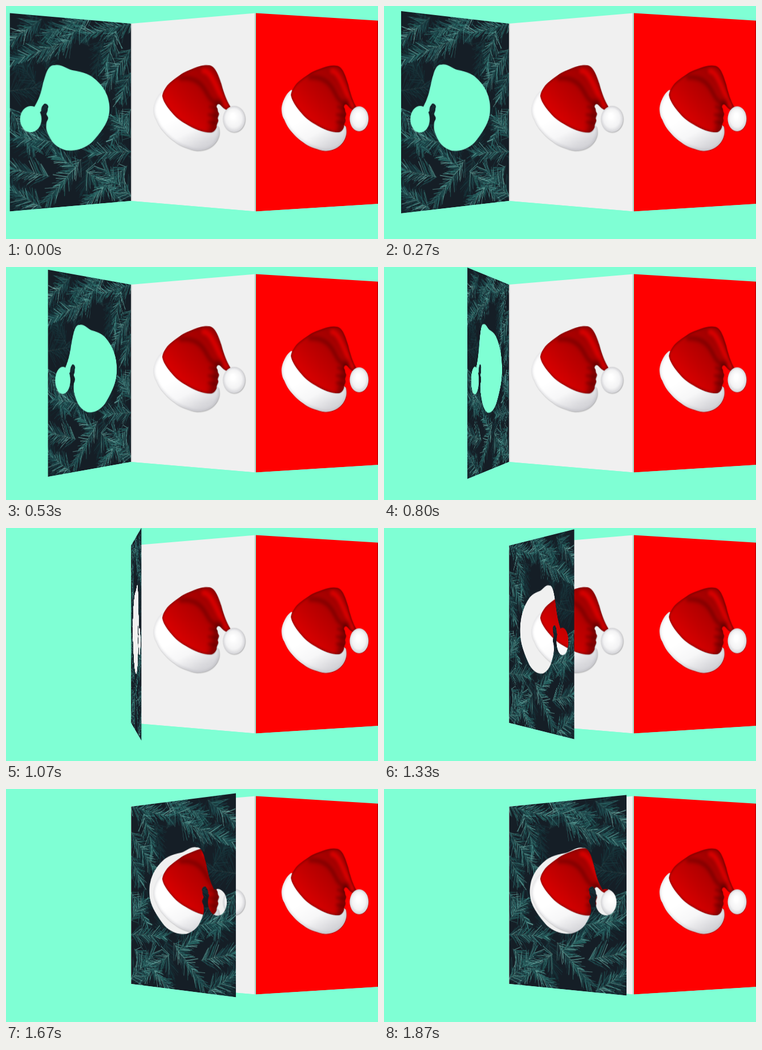
Write an HTML page with a canvas that moves like this. It is 652 px wide and 410 px high and loops after 1940 ms.

```html
<!DOCTYPE html>
<html lang="en">
<head>
<meta charset="utf-8">
<title>Folding holiday card</title>
<style>
  html, body { margin: 0; width: 100%; height: 100%; overflow: hidden; background: #7fffd4; }
  #stage {
    position: relative; width: 652px; height: 410px; overflow: hidden;
    background: #7fffd4; perspective: 1487px; perspective-origin: 194px 187px;
  }
  canvas { position: absolute; top: 31px; left: 219px; height: 312px; transform-origin: 0 50%; }
  #middle { transform: rotateY(-39.4deg); }
  #right { transform: translate3d(193px, 0, 158.4px) rotateY(26.2deg); }
  #cover { left: auto; right: 433px; transform-origin: 100% 50%; transform: rotateY(39.4deg); }
</style>
</head>
<body>
<div id="stage">
  <canvas id="middle"></canvas>
  <canvas id="right"></canvas>
  <canvas id="cover"></canvas>
</div>
<script>
const W = 249.2, LAST_W = 252, H = 312, RES = 2;

// Shapes in flat panel units, measured from the fold.
const ball = new Path2D();
ball.ellipse(209.8, 167, 20.5, 21, 0, 0, 7);
const opening = new Path2D(`M164 79 C150 76 140 84 128 86 C110 88 98 90 86 96
  C74 103 62 112 55 125 C47 139 47 157 53 169 C60 183 75 197 87 207
  C104 218 122 221 140 219 C156 215 166 208 171 200 C178 190 181 184 180 177
  C180 172 179 171 177 168 C174 162 182 161 179 157 C176 153 178 150 176 148
  C175 144 182 140 185 143 C188 146 190 148 190 154 L197 160 L203 147
  C192 132 189 119 186 108 C181 94 177 79 164 79Z`);
const brim = new Path2D(`M69 120 C60 124 50 139 49.5 151 C50 160 52 164 55 168
  C59 176 64 183 70 188 C77 195 84 200 93 205 C102 211 112 214 122 216.5
  C130 219 137 220 142 219.5 C154 219 163 215 169 211 C176 206 179 201 180.5 197
  C183 192 183 186 181 180 L150 160Z`);
const cloth = new Path2D(`M68 128 C69 122 74 115 79 110 C86 104 95 99 104 94
  C112 89 120 87 128 84.5 C142 80 150 78 162 79 C174 80 180 95 186 110
  C190 123 195 136 203 147 L196 152 C190 150 187 146 183 143
  C179 141 176 145 177 148 C180 150 178 154 181 157 C183 161 177 164 180 168
  C181 172 176 175 177 180 C174 187 169 189 164 189
  C148 189 130 182 116 175 C105 170 96 164 90 158 C80 149 70 138 68 128Z`);

function panel(id, width) {
  const canvas = document.getElementById(id);
  canvas.style.width = width + 'px';
  canvas.width = Math.round(width * RES);
  canvas.height = H * RES;
  const ctx = canvas.getContext('2d');
  ctx.scale(RES, RES);
  ctx.lineCap = ctx.lineJoin = 'round';
  return ctx;
}

function fade(gradient, ...stops) {
  for (const [at, color] of stops) gradient.addColorStop(at, color);
  return gradient;
}

function soft(ctx, path, color, width, blur) {
  ctx.filter = `blur(${blur * RES}px)`;
  ctx.strokeStyle = color;
  ctx.lineWidth = width;
  ctx.stroke(typeof path === 'string' ? new Path2D(path) : path);
  ctx.filter = 'none';
}

function shadowed(ctx, path, fill) {
  ctx.save();
  ctx.shadowColor = 'rgba(0,0,0,.4)';
  ctx.shadowBlur = 3;
  ctx.shadowOffsetX = ctx.shadowOffsetY = 1;
  ctx.fillStyle = fill;
  ctx.fill(path);
  ctx.restore();
}

function clipped(ctx, path, draw) {
  ctx.save();
  ctx.clip(path);
  draw();
  ctx.restore();
}

function drawHat(ctx) {
  shadowed(ctx, brim, fade(ctx.createLinearGradient(100, 165, 125, 222),
    [0, '#ffffff'], [.5, '#f7f7f8'], [1, '#d6d6da']));
  clipped(ctx, brim, () => soft(ctx, brim, 'rgba(130,130,140,.35)', 3, 2.5));

  shadowed(ctx, cloth, '#b40000');
  clipped(ctx, cloth, () => {
    ctx.fillStyle = fade(ctx.createLinearGradient(88, 165, 150, 95),
      [0, '#de0000'], [.45, '#c20000'], [1, '#a40000']);
    ctx.fillRect(50, 70, 160, 130);
    soft(ctx, 'M152 88 C166 88 174 112 195 145', '#d80000', 9, 3);
    soft(ctx, 'M106 99 C134 97 148 108 158 124 C166 137 172 141 182 142', 'rgba(85,0,0,.6)', 6, 3.5);
    soft(ctx, 'M180 150 L164 147 M180 162 L162 160 M178 174 L162 172', 'rgba(70,0,0,.4)', 4, 2.5);
    soft(ctx, 'M183 141 C174 152 177 172 168 188', 'rgba(80,0,0,.6)', 12, 5);
    soft(ctx, cloth, 'rgba(90,0,0,.6)', 3, 1.8);
  });

  shadowed(ctx, ball, fade(ctx.createRadialGradient(208, 162, 4, 209.8, 167, 21),
    [0, '#ffffff'], [.65, '#f3f3f4'], [1, '#d2d2d6']));
}

let seed = 41;
function rnd(lo = 0, hi = 1) {
  seed = (seed * 16807) % 2147483647;
  return lo + (hi - lo) * seed / 2147483647;
}

const pick = list => list[Math.floor(rnd(0, list.length))];
const dim = ['#12292f', '#15343a', '#1a3b41', '#183037'];
const lit = ['#1b4549', '#235558', '#2d6b6a', '#3d807d', '#66a39c', '#193a41', '#24625f'];

function line(ctx, x, y, x2, y2, color, width) {
  ctx.strokeStyle = color;
  ctx.lineWidth = width;
  ctx.beginPath();
  ctx.moveTo(x, y);
  ctx.lineTo(x2, y2);
  ctx.stroke();
}

function branch(ctx, x0, y0, x1, y1, colors) {
  const dx = x1 - x0, dy = y1 - y0;
  const dir = Math.atan2(dy, dx), count = Math.hypot(dx, dy);
  line(ctx, x0, y0, x0 + dx * .85, y0 + dy * .85, '#51423e', 1.2);
  for (let i = 0; i < count; i++) {
    const t = i / count, side = i % 2 ? 1 : -1;
    const a = dir + side * rnd(.3, 1) * (1.15 - t * .5);
    const len = rnd(14, 34) * (1 - t * .25);
    const x = x0 + dx * t, y = y0 + dy * t;
    line(ctx, x, y, x + Math.cos(a) * len, y + Math.sin(a) * len, pick(colors), rnd(.5, 1.15));
  }
}

const branches = [
  [165, -10, 70, 30], [150, 5, 100, 40], [120, 35, 5, 75], [60, 5, 0, 45],
  [250, 0, 150, 25], [248, 45, 185, 115], [215, 15, 190, 80], [250, 85, 225, 130],
  [250, 150, 205, 205], [248, 200, 215, 165], [0, 150, 45, 215], [90, 205, 10, 195],
  [250, 225, 160, 225], [140, 235, 70, 300], [130, 250, 85, 225], [75, 260, 0, 245],
  [150, 255, 225, 305], [240, 250, 150, 310], [60, 310, -5, 275], [250, 305, 190, 255]
];

function drawPine(ctx) {
  ctx.fillStyle = '#151e26';
  ctx.fillRect(0, 0, W, H);
  for (let i = 0; i < 24; i++) {
    const x = rnd(0, W), y = rnd(0, H), a = rnd(0, 6.28);
    branch(ctx, x, y, x + 60 * Math.cos(a), y + 60 * Math.sin(a), dim);
  }
  for (const b of branches) branch(ctx, ...b, lit);
  // The fold is on the right, so the hat opening is mirrored.
  ctx.translate(W, 0);
  ctx.scale(-1, 1);
  ctx.globalCompositeOperation = 'destination-out';
  ctx.fill(opening);
  ctx.fill(ball);
}

function drawPage(id, width, color, edge, both) {
  const ctx = panel(id, width);
  ctx.fillStyle = color;
  ctx.fillRect(0, 0, width, H);
  ctx.fillStyle = edge;
  ctx.fillRect(width - 2, 0, 3, H);
  if (both) ctx.fillRect(0, 0, 2, H);
  drawHat(ctx);
}

drawPage('middle', W, '#f0f0f0', '#cdcdcd', true);
drawPage('right', LAST_W, '#ff0000', '#a80000', false);
drawPine(panel('cover', W));

// Cover angle in degrees at a few steps, joined by a smooth curve.
const LOOP = 1940, LAST = 28;
const poses = [[0, 39.4], [4, 47.3], [8, 59], [12, 74.8], [16, 92.5], [20, 111.8], [25, 128.9], [28, 135.9]];

function slope(i) {
  const a = poses[Math.max(i - 1, 0)], b = poses[Math.min(i + 1, poses.length - 1)];
  return (b[1] - a[1]) / (b[0] - a[0]);
}

function angleAt(step) {
  let i = 0;
  while (i < poses.length - 2 && poses[i + 1][0] <= step) i++;
  const [s0, a0] = poses[i], [s1, a1] = poses[i + 1];
  const d = s1 - s0, t = (step - s0) / d, r = 1 - t;
  return r * r * (1 + 2 * t) * a0 + t * t * (3 - 2 * t) * a1
    + d * t * r * (r * slope(i) - t * slope(i + 1));
}

// Fifteen steps per second, with start times rounded to 10 ms.
function stepAt(ms) {
  let step = LAST;
  while (Math.round(step * 20 / 3) * 10 > ms) step--;
  return step;
}

const cover = document.getElementById('cover');
const start = performance.now();
function tick() {
  const step = stepAt(Math.max(0, performance.now() - start) % LOOP);
  cover.style.transform = `rotateY(${angleAt(step).toFixed(3)}deg)`;
  requestAnimationFrame(tick);
}
tick();
</script>
</body>
</html>
```
